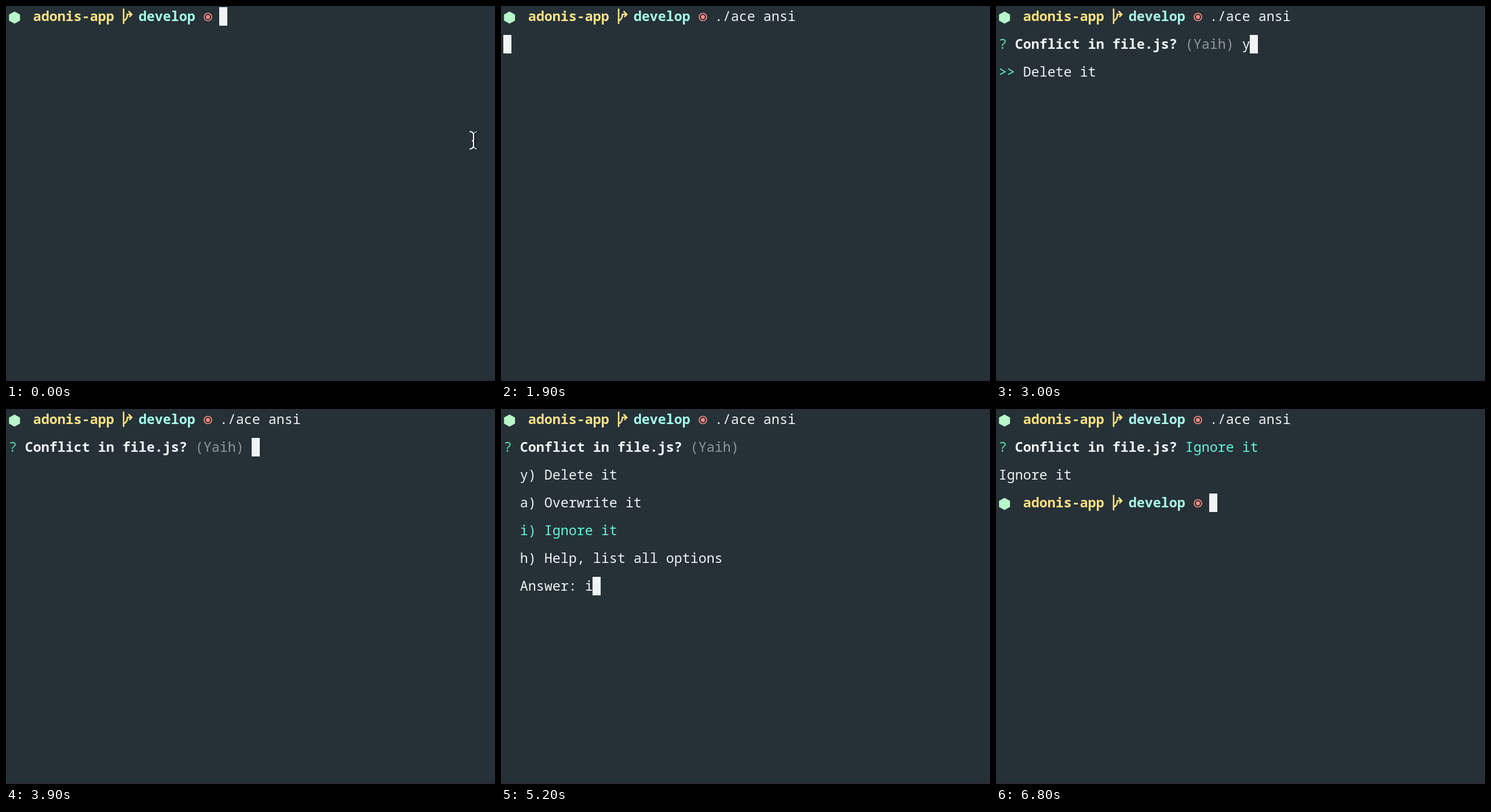
An HTML page with a canvas that plays this animation: 844x648 px, repeating every 6900 ms.

```html
<!DOCTYPE html>
<html lang="en">
<head>
<meta charset="utf-8">
<title>Terminal prompt</title>
<style>
  html, body { margin: 0; width: 100%; height: 100%; overflow: hidden; background: #253137; }
  canvas { display: block; }
</style>
</head>
<body>
<canvas id="stage" width="844" height="648"></canvas>
<script>
const ctx = document.getElementById('stage').getContext('2d');
const LOOP = 6900, CELL = 14, LINE = 48, LEFT = 4;
const WHITE = '#f1f3f5', GRAY = '#8f979b', YELLOW = '#ffe184', CYAN = '#a7fdeb',
      TEAL = '#64f5da', GREEN = '#5cdfae', RED = '#ff8a80';
const COMMAND = './ace ansi';

function text(str, col, row, color = WHITE, weight = 500) {
  ctx.font = `${weight} 23.333px "Noto Sans Mono", "DejaVu Sans Mono", monospace`;
  ctx.fillStyle = color;
  ctx.fillText(str, LEFT + 0.7 + col * CELL, 26 + row * LINE);
}

function caret(col, row) {
  ctx.fillStyle = WHITE;
  ctx.fillRect(LEFT + col * CELL, 2 + row * LINE, CELL, 32);
}

function stroke(path, color, width) {
  ctx.strokeStyle = color;
  ctx.lineWidth = width;
  ctx.stroke(new Path2D(path));
}

function prompt(row) {
  ctx.save();
  ctx.translate(0, row * LINE);
  ctx.fillStyle = '#b9f6ca';
  ctx.fill(new Path2D('M14.7 9.5L24.2 14.7V25.3L14.7 30.5L5.2 25.3V14.7Z'));
  // branch symbol
  stroke('M203 4.5V31M203 25.5Q209.5 23 209.5 14.5H217M211.5 9L217 14.5L213 19', YELLOW, 2.6);
  stroke('M355 19A6.5 6.5 0 1 1 342 19A6.5 6.5 0 1 1 355 19', RED, 1.7);
  ctx.fillStyle = RED;
  ctx.beginPath();
  ctx.arc(348.5, 19, 3.4, 0, 7);
  ctx.fill();
  ctx.restore();
  text('adonis-app', 3, row, YELLOW, 600);
  text('develop', 16, row, CYAN, 600);
}

function pointer() {
  stroke('M816 217Q809 217 809 223V241Q809 247 816 247M809 233H813', '#12191c', 1.8);
  stroke('M800 217Q807 217 807 223V241Q807 247 800 247M804 233H807', '#fff', 2);
  stroke('M807 222Q808 218 813 217M807 242Q808 246 813 247', '#fff', 1.2);
}

function question() {
  text('?', 0, 1, GREEN);
  text('Conflict in file.js?', 2, 1, WHITE, 700);
}

// One-letter answer with its meaning below
function shortAnswer(t) {
  const [key, label] =
    t < 2500 ? [''] :
    t < 3200 ? ['y', 'Delete it'] :
    t < 3400 ? [''] :
    t < 3800 ? ['a', 'Overwrite it'] :
    t < 4100 ? [''] : ['h', 'Help, list all options'];
  text(key, 30, 1);
  caret(30 + key.length, 1);
  if (label) {
    text('>>', 0, 2, TEAL);
    text(label, 3, 2);
  }
}

function menu(chosen) {
  ['y) Delete it', 'a) Overwrite it', 'i) Ignore it', 'h) Help, list all options']
    .forEach((item, i) => text(item, 2, 2 + i, item[0] === chosen ? TEAL : WHITE));
  text('Answer: ' + chosen, 2, 6);
  caret(10 + chosen.length, 6);
}

function result(t) {
  text('Ignore it', 23, 1, TEAL);
  text('Ignore it', 0, 2);
  if (t < 6800) return caret(0, 3);
  prompt(3);
  caret(26, 3);
}

function draw(t) {
  ctx.fillStyle = '#253137';
  ctx.fillRect(0, 0, 844, 648);
  ctx.fillStyle = '#2b2a36';
  ctx.fillRect(0, 645, 844, 3);
  prompt(0);

  const typed = Math.max(0, Math.min(COMMAND.length, Math.floor((t - 200) / 100)));
  text(COMMAND.slice(0, typed), 26, 0);
  if (!typed) pointer();
  if (t < 1400) return caret(26 + typed, 0);
  if (t < 2000) return caret(0, 1);

  question();
  if (t >= 6600) return result(t);
  text('(Yaih)', 23, 1, GRAY);
  if (t < 5000) shortAnswer(t);
  else menu(t < 5200 ? '' : 'i');
}

function tick() {
  draw(performance.now() % LOOP);
  requestAnimationFrame(tick);
}
tick();
</script>
</body>
</html>
```
